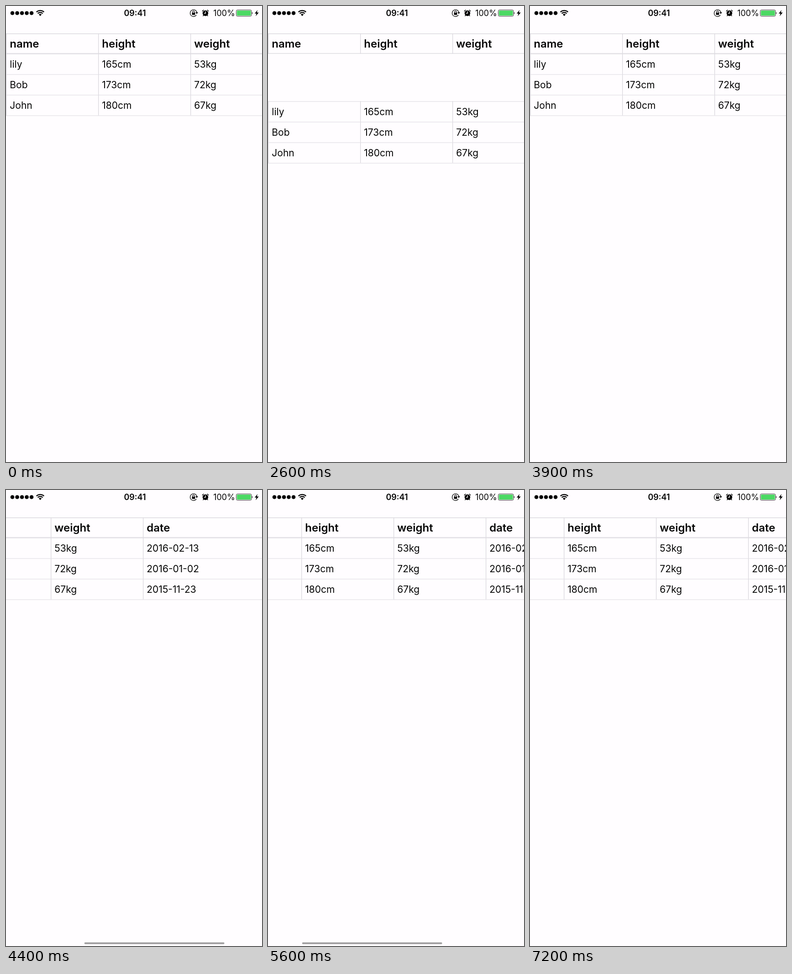
Write an HTML page that moves like this. It is 561 px wide and 998 px high and loops after 8100 ms.

```html
<!DOCTYPE html>
<html lang="en">
<head>
<meta charset="utf-8">
<title>Scrolling table</title>
<style>
  html, body { margin: 0; width: 100%; height: 100%; overflow: hidden; background: #fffdff; }
  svg { display: block; width: 561px; height: 998px; }
  text { font-family: Inter, Roboto, "Liberation Sans", sans-serif; fill: #050505; }
  .cell { font-size: 21px; }
  .head { font-size: 24px; font-weight: 600; }
  .status { font-size: 18px; }
  .time { font-weight: 600; }
  .rule { fill: #d9d8dd; }
  .thin { fill: #e1e0e4; }
</style>
</head>
<body>
<svg viewBox="0 0 561 998" xmlns="http://www.w3.org/2000/svg">
  <defs>
    <clipPath id="pane"><rect x="0" y="104.5" width="561" height="894"/></clipPath>
  </defs>

  <g id="dots"></g>
  <g fill="none" stroke="#000" stroke-width="2.3">
    <path d="M66.7 13.2 A12 12 0 0 1 83.3 13.2"/>
    <path d="M69.6 16.3 A7.8 7.8 0 0 1 80.4 16.3"/>
  </g>
  <path d="M75 22 L71.8 18.6 A4.6 4.6 0 0 1 78.2 18.6 Z"/>
  <text class="status time" x="282.5" y="22" text-anchor="middle">09:41</text>

  <g fill="none" stroke="#111" stroke-width="1.3">
    <path d="M417.2 19.6 A7.4 7.4 0 1 1 418.2 14"/>
    <path d="M408.9 15 V13 A2.1 2.1 0 0 1 413.1 13 V15"/>
  </g>
  <path d="M415 13.8 H421 L418 17.6 Z"/>
  <rect x="407.6" y="14.4" width="6.8" height="5" rx=".6"/>

  <circle cx="437" cy="15.8" r="6.2"/>
  <g fill="none" stroke="#000" stroke-width="1.5" stroke-linecap="round">
    <path d="M430.4 11.4 A6 6 0 0 1 432.8 8.9"/>
    <path d="M443.6 11.4 A6 6 0 0 0 441.2 8.9"/>
    <path d="M433 20.2 L432 21.6"/>
    <path d="M441 20.2 L442 21.6"/>
  </g>
  <path d="M437.3 11.8 V16.2 H433.8" fill="none" stroke="#fffdff" stroke-width="1.3"/>

  <text class="status" x="454.2" y="22">100%</text>
  <rect x="504.6" y="8.6" width="33.4" height="13.8" rx="2.6" fill="none" stroke="#333"/>
  <rect x="506" y="10" width="30.6" height="11" rx="1.2" fill="#4bd863"/>
  <path d="M539.2 13 Q541.4 15.5 539.2 18 Z"/>
  <path d="M551.2 8.8 L545 16.4 H548.8 L547.2 22.2 L553.8 14.2 H549.8 Z"/>

  <g clip-path="url(#pane)"><g id="rows"></g></g>
  <g id="header"></g>
  <rect id="bar" y="990" height="4" rx="2" fill="#000" opacity="0"/>
</svg>

<script>
const NS = "http://www.w3.org/2000/svg";
const byId = id => document.getElementById(id);
const header = byId("header"), rows = byId("rows"), bar = byId("bar");

const LOOP = 8100, STEP = 100, SETTLE = 110;
const COL = 202, ROW = 45, WIDTH = 1010, VIEW = 561, PAD = 8.3;
const MAX_X = WIDTH - VIEW, REST_X = 128;
const titles = ["name", "height", "weight", "date"];
const people = [
  ["lily", "165cm", "53kg", "2016-02-13"],
  ["Bob", "173cm", "72kg", "2016-01-02"],
  ["John", "180cm", "67kg", "2015-11-23"]
];

function add(parent, tag, attrs, text) {
  const el = document.createElementNS(NS, tag);
  for (const k in attrs) el.setAttribute(k, attrs[k]);
  if (text) el.textContent = text;
  parent.appendChild(el);
}
const box = (parent, cls, x, y, width, height) =>
  add(parent, "rect", { class: cls, x, y, width, height });

function build() {
  for (let i = 0; i < 5; i++)
    add(byId("dots"), "circle", { cx: 14 + 10.5 * i, cy: 15.5, r: 4.3 });

  box(header, "rule", 0, 60, WIDTH, 1.4);
  box(header, "rule", 0, 103.2, WIDTH, 1.3);
  box(header, "rule", WIDTH - 1.4, 60, 1.4, 44.5);
  box(rows, "rule", 0, 104.5, WIDTH, 1);
  titles.forEach((title, c) => {
    box(header, "rule", c * COL, 60, 1.3, 44.5);
    box(rows, "rule", c * COL, 104.5, 1.3, ROW * people.length);
    add(header, "text", { class: "head", x: c * COL + PAD, y: 91 }, title);
  });
  people.forEach((person, r) => {
    box(rows, "thin", 0, 149.4 + r * ROW, WIDTH, 1.2);
    person.forEach((value, c) =>
      add(rows, "text", { class: "cell", x: c * COL + PAD, y: 135 + r * ROW }, value));
  });
}

const ramp = (t, from, to) => Math.min(1, Math.max(0, (t - from) / (to - from)));
const smooth = p => p * p * (3 - 2 * p);
const easeOut = p => 1 - (1 - p) ** 3;

// A pull past the edge, then an exponential spring back after release.
const pull = (t, from, release, peak) =>
  peak * (t < release ? smooth(ramp(t, from, release)) : Math.exp((release - t) / SETTLE));

const scrollY = t => Math.trunc(
  pull(t, 2175, 2550, 164) + pull(t, 2900, 3250, -98) + pull(t, 6350, 6700, -94));

const scrollX = t => Math.trunc(
  MAX_X * smooth(ramp(t, 3900, 4700)) + pull(t, 4600, 4850, 36)
  - (MAX_X - REST_X) * easeOut(ramp(t, 5100, 5700)));

function draw(time) {
  const t = Math.floor((time % LOOP) / STEP) * STEP;
  const x = scrollX(t);
  header.setAttribute("transform", `translate(${-x} 0)`);
  rows.setAttribute("transform", `translate(${-x} ${scrollY(t)})`);

  // The scroll bar shrinks against the edge while overscrolled.
  const length = 307 - Math.max(0, x - MAX_X);
  bar.setAttribute("x", x > MAX_X ? 557 - length : 4 + x / MAX_X * 246);
  bar.setAttribute("width", length);
  bar.setAttribute("opacity", 0.36 * ramp(t, 3900, 4000) * (1 - ramp(t, 5900, 6100)));
}

build();
const start = performance.now();
function tick() {
  draw(performance.now() - start);
  requestAnimationFrame(tick);
}
tick();
</script>
</body>
</html>
```
